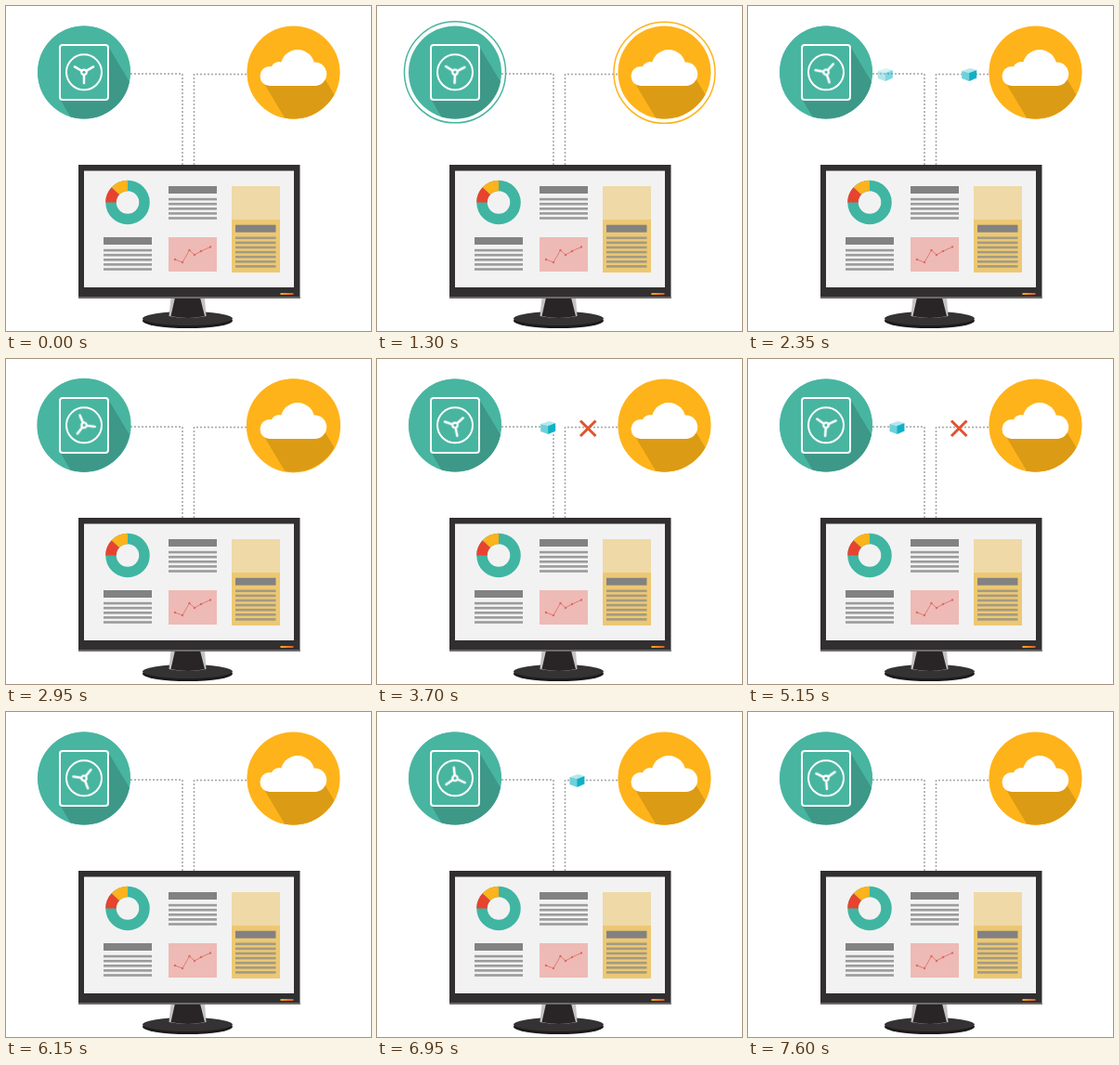
Recreate the animation shown at these times as an HTML page. Size 393 by 350 pixels, loop 7650 ms.

```html
<!DOCTYPE html>
<html lang="en">
<head>
<meta charset="utf-8">
<title>Backup to safe and cloud</title>
<style>
  html, body { margin: 0; width: 100%; height: 100%; overflow: hidden; background: #fff; }
  svg { display: block; width: 393px; height: 350px; }
  .wire { fill: none; stroke: #a2a2a2; stroke-width: 2; stroke-linecap: round; stroke-dasharray: 0 4; }
  .ring { fill: none; stroke-width: 1.5; r: 49px; }
  .outline { fill: none; stroke: #fff; stroke-width: 2; }
  .cube { transform: translate(197.5px, 181px); }
  .wheel { transform-origin: 84px 71.3px; animation: spin 7650ms linear infinite; }
  .cross { opacity: 0; animation: cross 7650ms linear infinite; }
  @keyframes spin { to { transform: rotate(720deg); } }
  @keyframes cross {
    0%, 38.9% { opacity: 0; }
    41.2%, 77.1% { opacity: 1; }
    79.7%, 100% { opacity: 0; }
  }
</style>
</head>
<body>
<svg viewBox="0 0 393 350">
  <defs>
    <clipPath id="safeClip"><circle cx="84" cy="71.5" r="50"/></clipPath>
    <clipPath id="cloudClip"><circle cx="309.5" cy="71.5" r="50"/></clipPath>
    <g id="box">
      <path d="M-8-4 1-7 8-5 0-2Z" fill="#b3e7ec"/>
      <path d="M-8-4 0-2V7L-8 4Z" fill="#6fd0da"/>
      <path d="M0-2 8-5V3.500L0 7Z" fill="#0eb1c6"/>
    </g>
    <linearGradient id="led">
      <stop offset="0" stop-color="#f6b021"/>
      <stop offset="1" stop-color="#e2572b"/>
    </linearGradient>
  </defs>

  <path class="wire" d="M135 73H190V171"/>
  <path class="wire" d="M258 73.500H202.500V171"/>

  <g class="cube" id="leftCube"><use href="#box"/></g>
  <g class="cube" id="rightCube"><use href="#box"/></g>

  <path class="cross" d="M219 66.500 235.500 83M235.500 66.500 219 83" stroke="#e0532f" stroke-width="3"/>

  <!-- safe -->
  <circle class="ring" id="safeRing" cx="84" cy="71.3" stroke="#48b5a0"/>
  <circle cx="84" cy="71.5" r="50" fill="#48b5a0"/>
  <path d="M109.500 42.500 170 143 118 201 58.500 101Z" fill="#3d9888" clip-path="url(#safeClip)"/>
  <rect x="58" y="42" width="52" height="59" rx="3" fill="#48b5a0"/>
  <rect class="outline" x="58" y="42" width="52" height="59" rx="3"/>
  <circle class="outline" cx="84" cy="71.3" r="19"/>
  <g class="wheel">
    <path d="M84 71.300V83M84 71.300 73.900 65.450M84 71.300 94.100 65.450" stroke="#fff" stroke-width="2.5" stroke-linecap="round"/>
    <circle cx="84" cy="71.3" r="3.8" fill="#fff"/>
    <circle cx="84" cy="71.3" r="1.6" fill="#48b5a0"/>
  </g>

  <!-- cloud -->
  <circle class="ring" id="cloudRing" cx="309.5" cy="71.8" stroke="#ffb31a"/>
  <circle cx="309.5" cy="71.5" r="50" fill="#ffb31a"/>
  <path d="M277 82 343 78 403 178 337 182Z" fill="#dc9b14" clip-path="url(#cloudClip)"/>
  <g fill="#fff">
    <circle cx="284" cy="75.5" r="10.500"/>
    <circle cx="294" cy="69" r="9"/>
    <circle cx="314" cy="65.300" r="18.300"/>
    <circle cx="332.500" cy="73.300" r="12.700"/>
    <rect x="284" y="68" width="49" height="18"/>
  </g>

  <!-- monitor -->
  <ellipse cx="195.5" cy="339" rx="48.500" ry="8" fill="#1d1a1b"/>
  <ellipse cx="195.5" cy="336.500" rx="48.500" ry="7.500" fill="#353233"/>
  <path d="M177.500 314H214L215.500 334Q196 338 175.500 334Z" fill="#c4c2c2"/>
  <path d="M182 314H209L214 334Q196 338 177.500 334Z" fill="#292526"/>
  <rect x="78" y="171" width="238.500" height="144" fill="#322f30"/>
  <rect x="78" y="313" width="238.500" height="2" fill="#6d6a6b"/>
  <rect x="84" y="177.500" width="226" height="125.500" fill="#f2f2f2"/>
  <rect x="295.500" y="309" width="14" height="2" fill="url(#led)"/>

  <!-- dashboard -->
  <g fill="none" stroke-width="11.500" transform="rotate(-90 131 211.500)">
    <circle cx="131" cy="211.500" r="18" stroke="#40b5a2"/>
    <circle cx="131" cy="211.500" r="18" stroke="#e8432f" pathLength="100" stroke-dasharray="0 75 12 13"/>
    <circle cx="131" cy="211.500" r="18" stroke="#fcb31c" pathLength="100" stroke-dasharray="0 87 13 0"/>
  </g>
  <rect x="175" y="249" width="52" height="37" fill="#eebab5"/>
  <path d="M182 273 190 276 197.500 263 203 268 210 264 220 259.500" fill="none" stroke="#de6a64" stroke-width=".8"/>
  <path d="M182 273h0M190 276h0M197.500 263h0M203 268h0M210 264h0M220 259.500h0" stroke="#de6a64" stroke-width="2.400" stroke-linecap="round"/>
  <rect x="243" y="194" width="52" height="36" fill="#efd9a7"/>
  <rect x="243" y="230" width="52" height="57" fill="#edc873"/>
  <g id="texts"></g>
</svg>
<script>
  const LOOP = 7650;
  const $ = id => document.getElementById(id);

  // Text blocks: a heading bar with evenly spaced lines below it
  function addText(x, y, width, rows, color) {
    const bar = (top, height, fill) =>
      `<rect x="${x}" y="${top}" width="${width}" height="${height}" fill="${fill}"/>`;
    let out = bar(y, 8, '#828282');
    for (let i = 0; i < rows; i++) out += bar(y + 12.8 + i * 5.1, 2.6, color);
    $('texts').innerHTML += out;
  }
  addText(175, 194, 52, 5, '#9b9b9b');
  addText(105, 249, 52, 5, '#9b9b9b');
  addText(247, 235.700, 43.500, 7, '#a39a82');

  // Keyframes given as [ms, style]
  function play(id, frames) {
    $(id).animate(frames.map(([ms, style]) => ({ offset: ms / LOOP, ...style })),
      { duration: LOOP, iterations: Infinity });
  }

  const pose = (x, y, opacity = 1) => ({ transform: `translate(${x}px, ${y}px)`, opacity });
  const home = pose(197.5, 181);

  // Rise from behind the screen, turn, then fade into the disc
  function cubeRuns(id, runs, fadeX, endX, turn, fade, end) {
    const frames = [[0, home]];
    for (const [start, pace] of runs) {
      const at = ms => start + ms * pace;
      frames.push([start, home], [at(turn), pose(197.5, 74)], [at(fade), pose(fadeX, 74)],
        [at(end), pose(endX, 74, 0)], [at(end), home]);
    }
    play(id, [...frames, [LOOP, home]]);
  }
  cubeRuns('leftCube', [[0, 1], [1550, 1], [3100, 1], [4420, 1]], 158.8, 135.4, 528, 740, 870);
  cubeRuns('rightCube', [[0, 1], [1550, 1], [6400, .85]], 242.5, 260, 528, 830, 950);

  function pulses(id, peaks) {
    const rest = { r: '49px' };
    const frames = peaks.flatMap(p => [[p - 200, rest], [p, { r: '58.3px' }], [p + 200, rest]]);
    play(id, [[0, rest], ...frames, [LOOP, rest]]);
  }
  pulses('safeRing', [1220, 2770, 4320, 5640]);
  pulses('cloudRing', [1220, 2770, 7385]);
</script>
</body>
</html>
```
